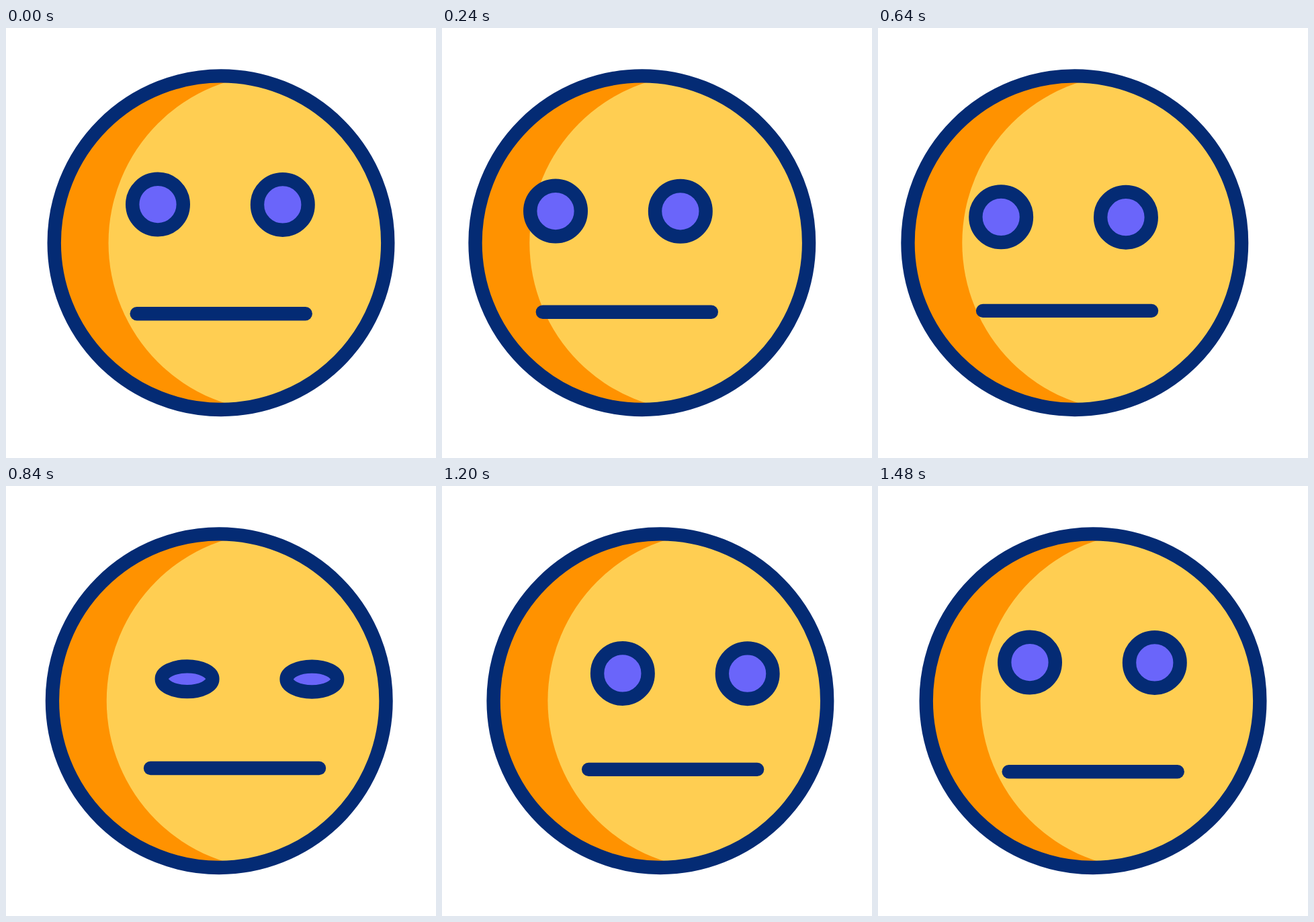
Animation of 640x640 px, one loop 2000 ms. Source, as an HTML page:

```html
<!DOCTYPE html>
<html lang="en">
<head>
<meta charset="utf-8">
<title>Glancing face</title>
<style>
  html, body { margin: 0; width: 100%; height: 100%; overflow: hidden; background: #fff; }
  svg { display: block; width: 100vw; height: 100vh; }
  .line { stroke: #042b74; stroke-width: 20.4; stroke-linecap: round; stroke-linejoin: round; }
</style>
</head>
<body>
<svg viewBox="0 0 640 640">
  <clipPath id="disc"><circle cy="319.7" r="248.3"/></clipPath>
  <g id="head">
    <circle cy="319.7" r="248.3" fill="#ff9200"/>
    <circle cx="83.5" cy="319.7" r="251" fill="#ffce52" clip-path="url(#disc)"/>
    <circle class="line" cy="319.7" r="248.3" fill="none"/>
  </g>
  <g id="eyes" fill="#6a65fa">
    <ellipse class="line" rx="37.8"/>
    <ellipse class="line" cx="185.8" cy="0.3" rx="37.8"/>
  </g>
  <path id="mouth" class="line" d="M10.2 0h251"/>
</svg>
<script>
const LOOP = 2000, STEP = 40;
const EYE_RADIUS = 37.8, BLINK_MIDDLE = 880, BLINK_HALF = 80;

// Where each part sits when the face looks ahead, left and right.
const poses = {
  head:  { ahead: [320, 0],       left: [283, 0],       right: [327, 0] },
  eyes:  { ahead: [226, 262.6],   left: [136.5, 278.2], right: [295.5, 289] },
  mouth: { ahead: [184.5, 425.2], left: [114, 421.3],   right: [222.5, 419.8] }
};

// The features lead the head slightly in every turn.
const turns = [
  { from: "ahead", to: "left",  head: [0, 400],     features: [0, 377] },
  { from: "left",  to: "right", head: [560, 920],   features: [532, 900] },
  { from: "right", to: "ahead", head: [1080, 1480], features: [1080, 1393] }
];

const progress = (time, [start, end]) =>
  Math.min(1, Math.max(0, (time - start) / (end - start)));

function position(part, time) {
  const span = part === "head" ? "head" : "features";
  const turn = turns.findLast(({ [span]: [start] }) => time >= start);
  const from = poses[part][turn.from], to = poses[part][turn.to];
  const p = progress(time, turn[span]);
  return from.map((v, axis) => v + (to[axis] - v) * p);
}

const nodes = Object.keys(poses).map(part => document.getElementById(part));

function draw(now) {
  const time = Math.floor((now % LOOP) / STEP) * STEP;
  for (const node of nodes)
    node.setAttribute("transform", `translate(${position(node.id, time)})`);

  const openness = Math.min(1, Math.abs(time - BLINK_MIDDLE) / BLINK_HALF);
  for (const eye of document.querySelectorAll("#eyes ellipse"))
    eye.setAttribute("ry", Math.max(0.1, EYE_RADIUS * openness));
}

const start = performance.now();
function tick() {
  draw(performance.now() - start);
  requestAnimationFrame(tick);
}
tick();
</script>
</body>
</html>
```
